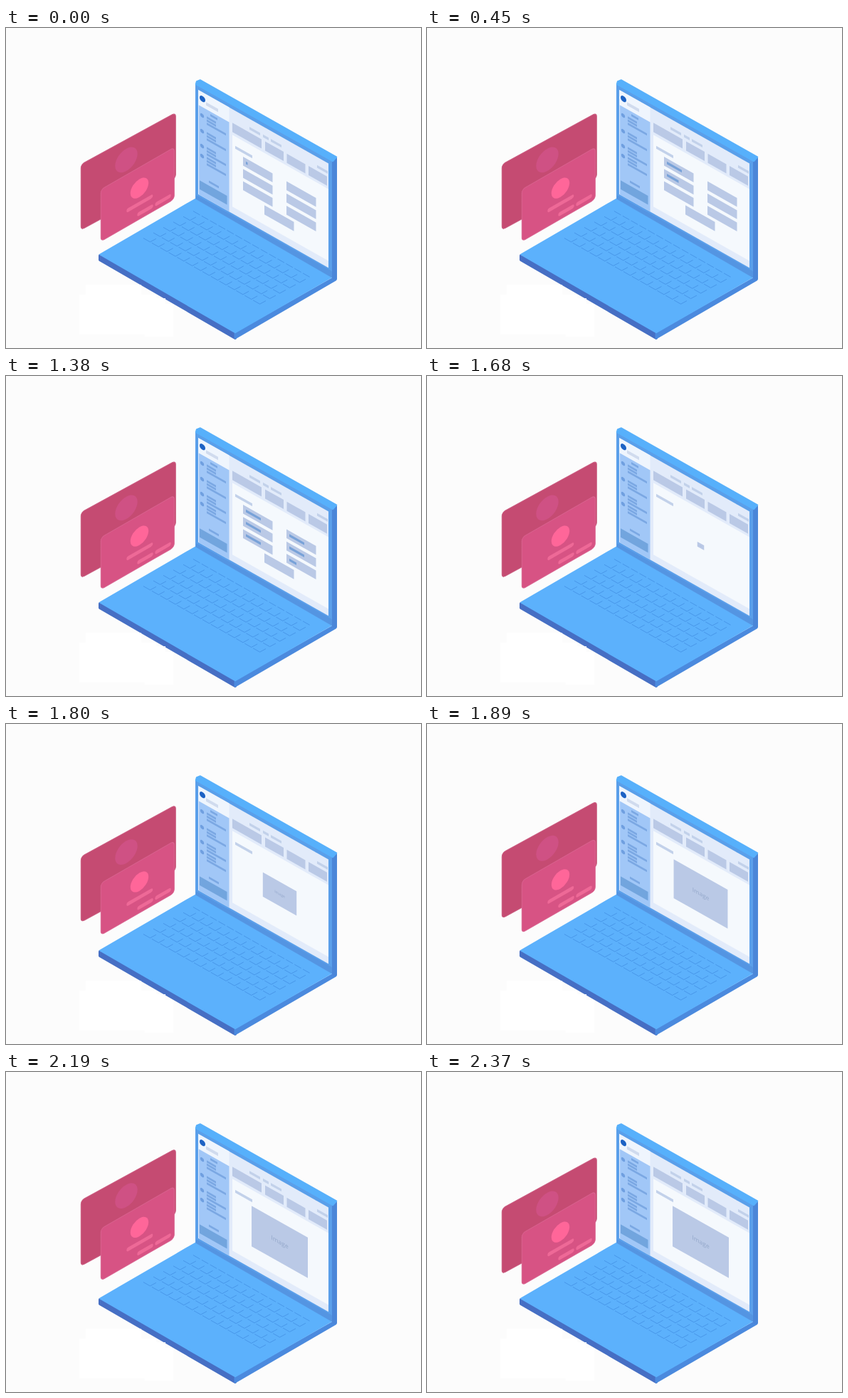
These frames come from a looping animation (583 px wide and 450 px high, 2400 ms). An HTML page:

```html
<!DOCTYPE html>
<html lang="en">
<head>
<meta charset="utf-8">
<title>Laptop and cards</title>
<style>
html, body { margin: 0; width: 100%; height: 100%; overflow: hidden; background: #fcfcfc; }
svg { display: block; width: 583px; height: 450px; }
</style>
</head>
<body>
<svg id="stage" viewBox="0 0 583 450"></svg>
<script>
const LOOP = 2400, STEP = 30;
const TYPE = 252, SWITCH = 1650, GROW = 250;
const RISE = 1710, PEAK = 2050, LAND = 2370;
const FIELD = '#bac9e6', ITEM = '#7ba8e3', LABEL = '#c2d1ea';
const stage = document.getElementById('stage');
const clamp = (x) => Math.max(0, Math.min(1, x));

function add(parent, tag, attrs) {
  const el = document.createElementNS('http://www.w3.org/2000/svg', tag);
  for (const k in attrs) el.setAttribute(k, attrs[k]);
  return parent.appendChild(el);
}
const group = (p, transform = '') => add(p, 'g', { transform });
const rect = (p, x, y, width, height, fill, rx = 0) =>
  add(p, 'rect', { x, y, width, height, fill, rx });
const dot = (p, cx, cy, r, fill) => add(p, 'circle', { cx, cy, r, fill });
const poly = (points, fill, edge = 0) =>
  add(stage, 'polygon', { points, fill, stroke: fill, 'stroke-width': edge, 'stroke-linejoin': 'round' });

// Base: lower body, right edge, top surface
poly('132,320 322,430 322,436 132,326', '#466fc4', 4);
poly('322,430 463,350 463,354 322,436', '#4b8ade', 3);
poly('132.5,318.5 266,241 461,348 322,428', '#5cb1fc', 2.5);

function drawKeys(rows, cols) {
  const at = (s, r) => `${262 + 166 * s / cols - 14 * r} ${257 + 94 * s / cols + 7.6 * r}`;
  let d = '';
  for (let r = 0; r < rows; r++) {
    for (let s = 0; s < cols; s++) {
      d += `M${at(s + .08, r)}L${at(s + .88, r)}`;
      if (r) d += `L${at(s + .88, r - .6)}`;
    }
  }
  add(stage, 'path', { d, fill: 'none', stroke: '#4592e6', opacity: .85 });
}
drawKeys(6, 14);

// Lid: front frame, hinge side, right side, top edge
poly('267,79 459,187 459,351 267,240', '#5a9fea', 2);
poly('268,236 457,342 459,351 267,240', '#5495e2', 1);
poly('459,187 464,183 464,353 459,353', '#4b86d8', 2);
poly('268,75.5 273,73.5 464,181.5 459,187 267,79', '#57b0fb', 2.5);

const screen = group(stage, 'matrix(1 .566 0 1 270 87)');
rect(screen, 0, 0, 183, 146.7, '#e2ebfa');
rect(screen, 0, 0, 43.5, 21, '#eff5fd');
dot(screen, 6, 9.3, 4, '#1d62c4');
rect(screen, 11, 11, 17, 4.5, '#d0dbee');

// Sidebar
rect(screen, 1, 21, 42.5, 125.7, '#a1c7f7');
rect(screen, 17, 24.5, 10, 3, ITEM);
for (const v of [33, 55, 76, 90]) {
  dot(screen, 5.5, v, 2.7, '#6f9fe0');
  for (let i = 0; i < 3; i++) rect(screen, 12, v - 2.5 + 4.3 * i, i < 2 ? 13 : 27, 3, ITEM);
}
rect(screen, 15, 119, 14, 3, ITEM);
rect(screen, 2, 126, 38.5, 12.5, '#72a5de');

// Page header and sheet
for (const u of [72, 102, 167]) rect(screen, u, 11.3, 15, 3.6, LABEL);
rect(screen, 91, 11.3, 8, 3.6, LABEL);
for (let i = 0; i < 4; i++) rect(screen, i ? 63.5 + 30.5 * i : 48, 19.2, i ? 26 : 41, 13, FIELD);
rect(screen, 48, 36, 135, 101, '#f5f9fd');
rect(screen, 52, 49.3, 24, 4, LABEL);

// Form
const form = group(screen);
const bars = [];
for (let i = 0; i < 6; i++) {
  const u = i < 3 ? 63 : 124, v = 58.4 + 17.2 * (i % 3);
  rect(form, u, v, 41.5, 12.5, FIELD);
  bars.push(rect(form, u + 4, v + 4.5, 0, 3.6, '#78a2d8'));
}
const button = rect(form, 93, 109.6, 41.5, 13, FIELD);

// Picture placeholder
const image = group(screen);
rect(image, -39.5, -28.5, 79, 57, FIELD);
add(image, 'text', {
  y: 3, 'text-anchor': 'middle', 'font-size': 8.5, fill: '#93a7ca',
  'font-family': '"Open Sans", sans-serif'
}).textContent = 'Image';

// Cards: the outer group moves, the inner one is slanted
function card(x, y, slope, w, h, fill, rim) {
  const outer = group(stage);
  const face = group(outer, `matrix(1 ${-slope} 0 1 ${x} ${y})`);
  rect(face, 0, 0, w, h, fill, 5).setAttribute('stroke', rim);
  return [outer, face];
}
const [back, backFace] = card(105.3, 191.8, .547, 133, 92.3, '#c54b72', '#cb5c80');
dot(backFace, 63.7, 28.4, 15.7, '#cf5184');
const [front, frontFace] = card(133.3, 227, .575, 103, 73, '#d75384', '#da6390');
dot(frontFace, 54.2, 29.3, 12.7, '#ff6699');
rect(frontFace, 36, 48.3, 37, 5.4, '#ee6997', 2.7);
for (const u of [51, 76]) rect(frontFace, u, 62.5, 22.5, 5.4, '#ee6997', 2.7);

// White patch near the lower left edge
rect(stage, 112, 361, 78, 20, '#fff');
rect(stage, 103, 375, 108, 56, '#fff');
rect(stage, 195, 380, 29, 54, '#fff');
rect(stage, 224, 388, 11, 46, '#fff');

function draw(t) {
  form.style.display = t < SWITCH ? '' : 'none';
  bars.forEach((bar, i) => {
    const p = t / TYPE - i;
    bar.setAttribute('width', p < 0 ? 0 : Math.max(2.5, 21 * clamp(p)));
  });
  button.setAttribute('fill', t >= 6 * TYPE ? '#a9bfe2' : FIELD);

  const scale = clamp((t - SWITCH) / GROW);
  image.style.display = scale > 0 ? '' : 'none';
  image.setAttribute('transform', `translate(114.5 87.2) scale(${scale})`);

  const lift = Math.min(clamp((t - RISE) / (PEAK - RISE)), clamp((LAND - t) / (LAND - PEAK)));
  back.setAttribute('transform', `translate(0 ${-20 * lift})`);
  front.setAttribute('transform', `translate(0 ${-12 * lift})`);
}

const start = performance.now();
function tick() {
  const t = (performance.now() - start) % LOOP;
  draw(Math.floor(t / STEP) * STEP);
  requestAnimationFrame(tick);
}
tick();
</script>
</body>
</html>
```
